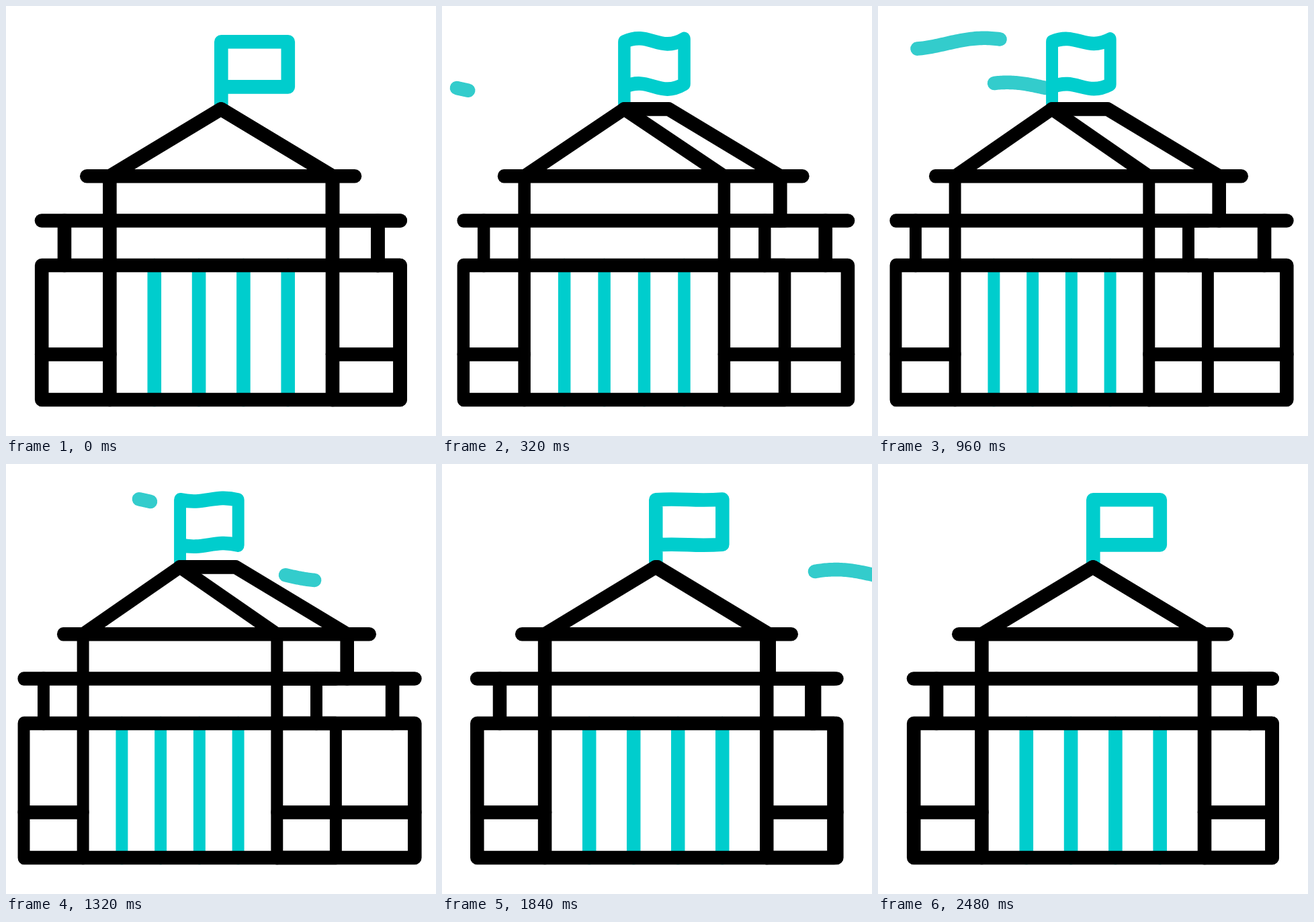
An HTML page with a canvas that plays this animation: 640x640 px, repeating every 3000 ms.

```html
<!DOCTYPE html>
<html lang="en">
<head>
<meta charset="utf-8">
<title>Building with flag</title>
<style>
  html, body { margin: 0; width: 100%; height: 100%; overflow: hidden; background: #fff; }
  canvas { display: block; width: 640px; height: 640px; }
</style>
</head>
<body>
<canvas id="stage" width="640" height="640"></canvas>
<script>
const ctx = document.getElementById('stage').getContext('2d');
const LOOP = 3000, STEP = 40;
const BLACK = '#000', TEAL = '#00cdcd', WIND = '#33cccc';

const clamp = v => Math.min(1, Math.max(0, v));
const mix = (a, b, u) => a + (b - a) * u;

// Cubic bezier easing with control points (.167,.167) and (.4,1)
function ease(u) {
  if (u <= 0) return 0;
  if (u >= 1) return 1;
  const curve = (a, b, k) => 3 * a * k * (1 - k) ** 2 + 3 * b * k * k * (1 - k) + k ** 3;
  let lo = 0, hi = 1;
  for (let i = 0; i < 24; i++) {
    const mid = (lo + hi) / 2;
    if (curve(.167, .4, mid) < u) lo = mid; else hi = mid;
  }
  return curve(.167, 1, lo);
}

function path(...points) {
  ctx.beginPath();
  points.forEach(([x, y]) => ctx.lineTo(x, y));
  ctx.stroke();
}

const hLine = (x1, x2, y) => path([x1, y], [x2, y]);
const vLine = (x, y1, y2) => path([x, y1], [x, y2]);

// Time and bend of the cloth: 1 is crest first, -1 is dip first
const WAVES = [[0, 0], [310, 1], [620, -1], [930, 1], [1240, -1],
               [1540, 1], [1890, 0], [2190, -1], [2480, 0]];

function bendAt(t) {
  const i = WAVES.findIndex(w => w[0] > t);
  if (i < 0) return 0;
  const [t0, b0] = WAVES[i - 1], [t1, b1] = WAVES[i];
  return mix(b0, b1, (t - t0) / (t1 - t0));
}

function drawFlag(bend) {
  const up = Math.max(0, bend), down = Math.max(0, -bend);
  const c1 = -18.5 * up + 17.5 * down;
  const c2 = 19 * up - 18.5 * down;
  const end = -4.7 * up + .8 * down;
  const left = 320.3, right = 419.8, top = 53.2, bottom = 120.4;
  ctx.strokeStyle = TEAL;
  ctx.beginPath();
  ctx.moveTo(left, 153);
  ctx.lineTo(left, top);
  ctx.bezierCurveTo(left + 42, top + c1, left + 58, top + c2, right, top + end);
  ctx.lineTo(right, bottom + end);
  ctx.bezierCurveTo(left + 58, bottom + c2, left + 42, bottom + c1, left, bottom);
  ctx.stroke();
}

function drawFront() {
  ctx.strokeStyle = TEAL;
  for (let i = 0; i < 4; i++) vLine(220.8 + i * 66.3, 386, 586);
  ctx.strokeStyle = BLACK;
  path([154.4, 253.3], [320, 153.4], [486, 253.3]);
  hLine(120.3, 486, 253.3);
  hLine(53, 586.7, 319.5);
  vLine(154.4, 253.3, 586);
  vLine(486, 253.3, 586);
  vLine(87, 319.5, 386);
  vLine(553.4, 319.5, 386);
  hLine(53.2, 154.4, 518.5);
  hLine(486, 586.6, 518.5);
  ctx.strokeRect(53.2, 386, 533.4, 200);
}

// Far side of the building, joined to the front by horizontal bars
function drawBack(frontX, shift) {
  ctx.strokeStyle = BLACK;
  path([frontX(320), 153.4], [320 + shift, 153.4], [486 + shift, 253.3]);
  hLine(frontX(486), 519 + shift, 253.3);
  hLine(frontX(486), 586.7 + shift, 319.5);
  vLine(486 + shift, 253.3, 319.5);
  vLine(553.4 + shift, 319.5, 386);
  hLine(frontX(586.6), 586.6 + shift, 518.5);
  path([frontX(486), 386], [586.6 + shift, 386], [586.6 + shift, 586], [frontX(486), 586]);
}

// x, y, head start, tail start
const GUSTS = [[22, 122, 281, 570], [-12, 56, 520, 778], [416, 165.3, 1222, 1481]];
const GUST_LENGTH = 227;

function drawGust(t, [x, y, headStart, tailStart]) {
  const head = GUST_LENGTH * clamp((t - headStart) / 516);
  const tail = GUST_LENGTH * clamp((t - tailStart) / 586);
  if (head <= tail) return;
  ctx.strokeStyle = WIND;
  ctx.beginPath();
  for (let i = 0; i <= 40; i++) {
    const d = mix(tail, head, i / 40);
    ctx.lineTo(x + d, y + 8.2 * Math.sin(2 * Math.PI * d / GUST_LENGTH));
  }
  ctx.stroke();
}

function draw(t) {
  const turn = t < 1360 ? ease(t / 600) : 1 - ease((t - 1360) / 600);
  const scale = 1 - .1294 * turn, offset = -19.8 * turn;
  const frontX = x => x * scale + offset;

  ctx.setTransform(1, 0, 0, 1, 0, 0);
  ctx.fillStyle = '#fff';
  ctx.fillRect(0, 0, 640, 640);
  ctx.lineWidth = 20.6;
  ctx.lineCap = ctx.lineJoin = 'round';

  GUSTS.forEach(g => drawGust(t, g));
  ctx.setTransform(scale, 0, 0, 1, offset, 0);
  drawFlag(bendAt(t));
  drawFront();
  ctx.setTransform(1, 0, 0, 1, 0, 0);
  drawBack(frontX, 21.7 * turn);
}

const start = performance.now();
function tick() {
  const t = (performance.now() - start) % LOOP;
  draw(Math.floor(t / STEP) * STEP);
  requestAnimationFrame(tick);
}
tick();
</script>
</body>
</html>
```
